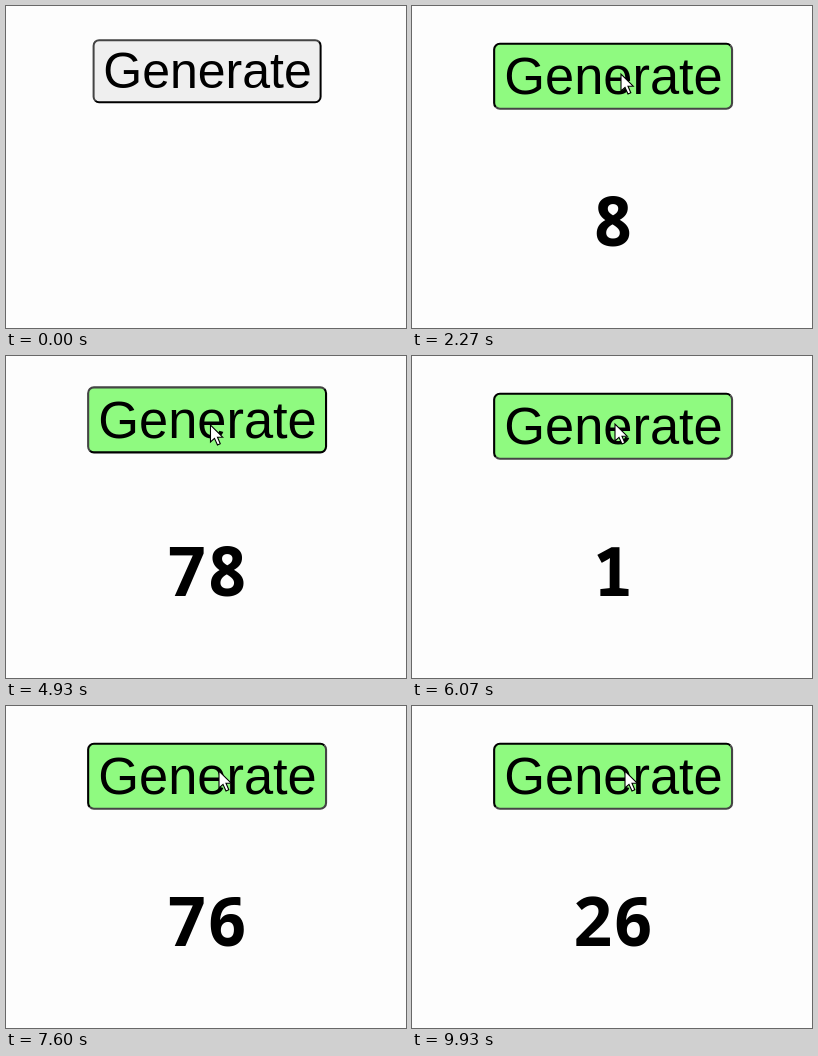
Write an HTML page that moves like this. It is 400 px wide and 322 px high and loops after 9990 ms.

```html
<!DOCTYPE html>
<html lang="en">
<head>
<meta charset="utf-8">
<title>Number generator</title>
<style>
  html, body { margin: 0; width: 100%; height: 100%; overflow: hidden; background: #fdfdfd; }
  svg { display: block; width: 400px; height: 322px; }
  .label { font: 50px "Liberation Sans", Arial, sans-serif; }
  .number { font: 600 67.5px "Noto Sans Mono", "DejaVu Sans Mono", monospace; }
  text { text-anchor: middle; }
</style>
</head>
<body>
<svg viewBox="0 0 400 322">
  <g id="button">
    <rect id="face" x="-113.5" y="-31" width="227" height="62" rx="5.5"/>
    <g fill="none" stroke-width="2">
      <path id="topLeft" d="M-111.9 29.4A5.5 5.5 0 0 1 -113.5 25.5V-25.5A5.5 5.5 0 0 1 -108 -31H108A5.5 5.5 0 0 1 111.9 -29.4"/>
      <path id="bottomRight" d="M111.9 -29.4A5.5 5.5 0 0 1 113.5 -25.5V25.5A5.5 5.5 0 0 1 108 31H-108A5.5 5.5 0 0 1 -111.9 29.4"/>
    </g>
    <text class="label" x="0.4" y="16.8">Generate</text>
  </g>
  <text id="number" class="number" x="201" y="239.5"></text>
  <path id="cursor" d="M0 0V17L4 13.3L7 20L9.8 18.8L7 12.2H12.2Z" fill="#fff" stroke="#000" stroke-width="1.1"/>
</svg>
<script>
  const LOOP = 9990;
  const PERIOD = 400;
  const FIRST_PRESS = 1060;
  const HOLD = 240;
  const values = [42, 87, 8, 63, 19, 94, 11, 55, 30, 78, 47, 1, 69, 23, 90, 76, 14, 51, 72, 38, 85, 26];
  // time, x, y of the pointer tip
  const route = [
    [70, 17, 74], [700, 209, 68], [2300, 209, 68], [3800, 209, 69],
    [5200, 204, 69], [6070, 203, 68], [7000, 213, 65], [LOOP, 213, 65]
  ];
  const el = id => document.getElementById(id);
  const [button, face, topLeft, bottomRight, number, cursor] =
    ["button", "face", "topLeft", "bottomRight", "number", "cursor"].map(el);

  function pointerAt(t) {
    const i = Math.max(1, route.findIndex(p => p[0] >= t));
    const [t0, x0, y0] = route[i - 1];
    const [t1, x1, y1] = route[i];
    const k = Math.max(0, (t - t0) / (t1 - t0));
    const e = k * k * (3 - 2 * k);
    return [x0 + (x1 - x0) * e, y0 + (y1 - y0) * e];
  }

  function draw(t) {
    const [x, y] = pointerAt(t);
    const shown = t >= route[0][0];
    const hover = shown && x >= 87;
    const since = t - FIRST_PRESS;
    const pressed = since >= 0 && since % PERIOD < HOLD;
    const count = Math.floor((since - HOLD) / PERIOD);

    const cy = pressed ? 70.2 : hover ? 63.9 : 65.2;
    button.setAttribute("transform", `translate(201.1 ${cy}) scale(${hover ? 1.048 : 1})`);
    face.setAttribute("fill", hover ? "#8ffa80" : "#efefef");
    topLeft.setAttribute("stroke", pressed ? "#000" : "#444");
    bottomRight.setAttribute("stroke", pressed ? "#444" : "#000");
    number.textContent = count < 0 ? "" : values[count];
    cursor.setAttribute("visibility", shown ? "visible" : "hidden");
    cursor.setAttribute("transform", `translate(${x} ${y})`);
  }

  const start = performance.now();
  function tick() {
    draw((performance.now() - start) % LOOP);
    requestAnimationFrame(tick);
  }
  draw(0);
  requestAnimationFrame(tick);
</script>
</body>
</html>
```
